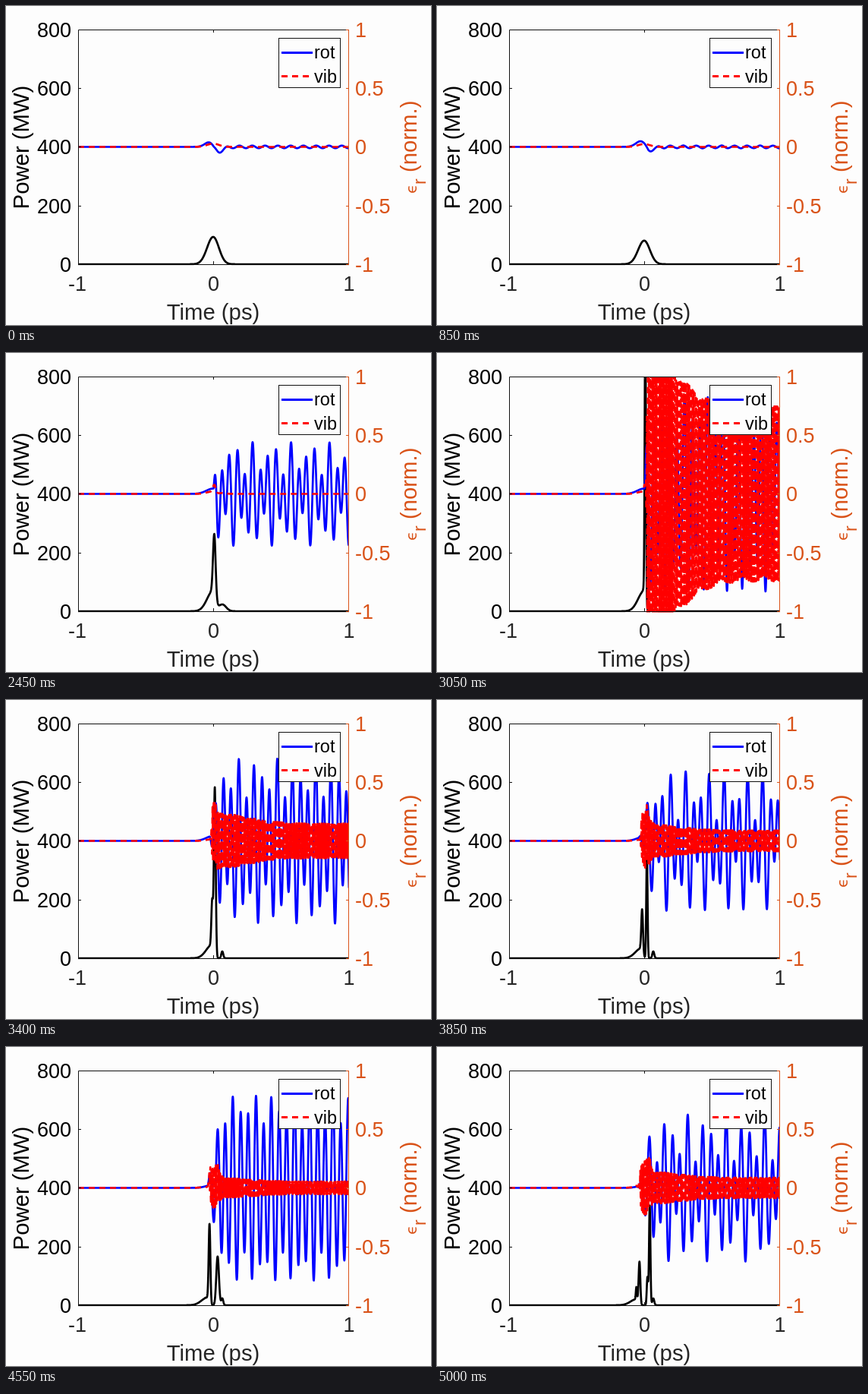
Write an HTML page with a canvas that moves like this. It is 560 by 420 pixels and loops after 5.05 s.

```html
<!DOCTYPE html>
<html lang="en">
<head>
<meta charset="utf-8">
<title>Pulse power and molecular response</title>
<style>
  html, body { margin: 0; width: 100%; height: 100%; overflow: hidden; background: #fdfdfd; }
  canvas, svg { position: absolute; left: 0; top: 0; width: 560px; height: 420px; }
  svg { font-family: "Liberation Sans", Arial, sans-serif; }
  .ticks { font-size: 27px; }
  .label { font-size: 29.3px; }
  .legend { font-size: 23.5px; }
  .end { text-anchor: end; }
  .mid { text-anchor: middle; }
  .orange { fill: #d95319; }
  .grey { fill: #262626; }
  .epsilon { font-family: "DejaVu Sans", sans-serif; font-size: 20px; }
</style>
</head>
<body>
<canvas id="plot" width="560" height="420"></canvas>
<svg viewBox="0 0 560 420">
  <g fill="none" stroke="#111" stroke-width="1">
    <path d="M452 31.5H95.5V340.5H452"/>
    <path d="M95 108.5h4M95 185.5h4M95 263.5h4M273.5 340v-4M273.5 31v4"/>
    <path stroke="#d95319" d="M451.5 31V341M452 31.5h-4M452 108.5h-4M452 185.5h-4M452 263.5h-4M452 340.5h-4"/>
  </g>
  <g class="ticks end">
    <text x="86" y="41">800</text><text x="86" y="118">600</text>
    <text x="86" y="195">400</text><text x="86" y="273">200</text>
    <text x="86" y="350">0</text>
  </g>
  <g class="ticks mid grey">
    <text x="94" y="375">-1</text><text x="273.5" y="375">0</text><text x="452" y="375">1</text>
  </g>
  <g class="ticks orange">
    <text x="460" y="41">1</text><text x="460" y="118">0.5</text>
    <text x="460" y="195">0</text><text x="460" y="273">-0.5</text>
    <text x="460" y="350">-1</text>
  </g>
  <text class="label mid grey" x="273" y="413">Time (ps)</text>
  <text class="label mid" transform="translate(30 186) rotate(-90)">Power (MW)</text>
  <g class="label orange" transform="translate(541 247) rotate(-90)">
    <text class="epsilon">ϵ</text>
    <text x="12" y="12" font-size="23">r</text>
    <text x="28">(norm.)</text>
  </g>
  <rect x="359.5" y="42.5" width="81" height="65" fill="#fdfdfd" stroke="#111"/>
  <g fill="none" stroke-width="2.8">
    <path stroke="#00f" d="M363 61.5H404"/>
    <path stroke="#f00" stroke-dasharray="8 6" d="M363 92.5H404"/>
  </g>
  <g class="legend"><text x="406" y="69">rot</text><text x="406" y="101">vib</text></g>
</svg>
<script>
const LOOP = 5050, STEP = 50;
const LEFT = 95, RIGHT = 452, TOP = 31, BOTTOM = 340, MIDDLE = 185.5;
const ROT_FAST = 10.14, ROT_SLOW = 16.85, VIB = 1.436;   // periods in px
const DX = VIB / 8.05;
const ctx = document.getElementById("plot").getContext("2d");

const clamp = v => Math.min(1, Math.max(0, v));
const ramp = (v, from, to) => clamp((v - from) / (to - from));
const ease = (v, from, to) => { const u = ramp(v, from, to); return u * u * (3 - 2 * u); };
const bell = (v, center, width) => Math.exp(-0.5 * ((v - center) / width) ** 2);
const gate = (v, center, width) => 1 / (1 + Math.exp((center - v) / width));
const wave = (v, period) => Math.cos(2 * Math.PI * v / period);

// The pulse steepens, collapses to a spike near 3050 ms, then splits in two.
function stateAt(t) {
  const split = ease(t, 3000, 3600);
  const drift = ramp(t, 3200, 5000);
  const beat = wave(t - 3050, 1400);
  return {
    base: 36 - 9 * ease(t, 0, 1600) - 11 * split - 8 * drift,
    baseX: 273 - 10 * drift,
    baseFall: 7.5 - 5.5 * ease(t, 1400, 2900),
    peak: 60 * ease(t, 1000, 2600) + 40 * ease(t, 2700, 3100) * (1 - beat) + 320 * bell(t, 3050, 250),
    peakX: 274.5 + 5.8 * drift,
    peakW: 4 - 3.2 * ease(t, 1600, 2900) + 0.5 * split * (1 + beat),
    front: split * (78 + 28 * beat),
    frontX: 272.3 - 5.5 * drift,
    shoulder: 16 * ease(t, 4500, 5000),
    tail: 9 * ease(t, 1500, 2400),
    tailW: 5 - 3.7 * ease(t, 2400, 3400),
    fast: gate(t, 2208, 220) * (83 + 24 * beat),
    fastCrest: 325 + 5.3 * ramp(t, 2450, 5000),
    slow: 1.7 + 25 * ease(t, 900, 3000) - 8 * beat * split,
    slowCrest: 324.5 + 6.4 * ease(t, 3400, 4600),
    start: 273.5 - 7 * split - 2 * drift,
    onset: 5 + 17 * split,
    swing: 6 * (1 - ease(t, 0, 2400)),
    lead: 7 * ease(t, 0, 1600) - 4 * drift,
    vib: 115 * bell(t, 3080, 150) + ease(t, 2900, 3300) * (11 - 3 * beat),
    burst: 14 * ease(t, 3300, 3800)
  };
}

function power(x, s) {
  return s.base * bell(x, s.baseX, x < s.baseX ? 8 : s.baseFall)
    + s.peak * bell(x, s.peakX, s.peakW)
    + s.front * bell(x, s.frontX, 1.1)
    + s.shoulder * (bell(x, 262.7, 0.7) + 2.3 * bell(x, 277.3, 0.9))
    + s.tail * bell(x, 285, s.tailW);
}

function rotation(x, s) {
  const on = ramp(x, s.start, s.start + s.onset), u = (x - 274) / 7;
  return on * (s.fast * wave(x - s.fastCrest, ROT_FAST) + s.slow * wave(x - s.slowCrest, ROT_SLOW))
    + (1 - on) * s.lead * bell(x, 273, 9)
    - s.swing * u * Math.exp((1 - u * u) / 2);
}

function vibration(x, s) {
  const on = gate(x, s.start + 3, 0.4);
  const envelope = s.vib * (1 + 0.6 * bell(x, 275, 42)) + s.burst * bell(x, 275, 5);
  return Math.min(12, 0.12 * power(x, s)) + on * envelope * wave(x - 275, VIB);
}

function trace(curve, zero, state, color, dash = []) {
  ctx.beginPath();
  for (let x = LEFT; x <= RIGHT; x += DX) ctx.lineTo(x, zero - curve(x, state));
  ctx.strokeStyle = color;
  ctx.setLineDash(dash);
  ctx.stroke();
}

function draw(t) {
  const state = stateAt(t);
  ctx.clearRect(0, 0, 560, 420);
  ctx.save();
  ctx.beginPath();
  ctx.rect(LEFT, TOP, RIGHT - LEFT, BOTTOM - TOP + 1.5);
  ctx.clip();
  ctx.lineWidth = 2.7;
  ctx.lineJoin = "round";
  trace(power, BOTTOM, state, "#000");
  trace(rotation, MIDDLE, state, "#00f");
  trace(vibration, MIDDLE, state, "#f00", [8, 6]);
  ctx.restore();
}

let shown = -1;
function tick() {
  const t = Math.floor(performance.now() % LOOP / STEP) * STEP;
  if (t !== shown) draw(shown = t);
  requestAnimationFrame(tick);
}
tick();
</script>
</body>
</html>
```
